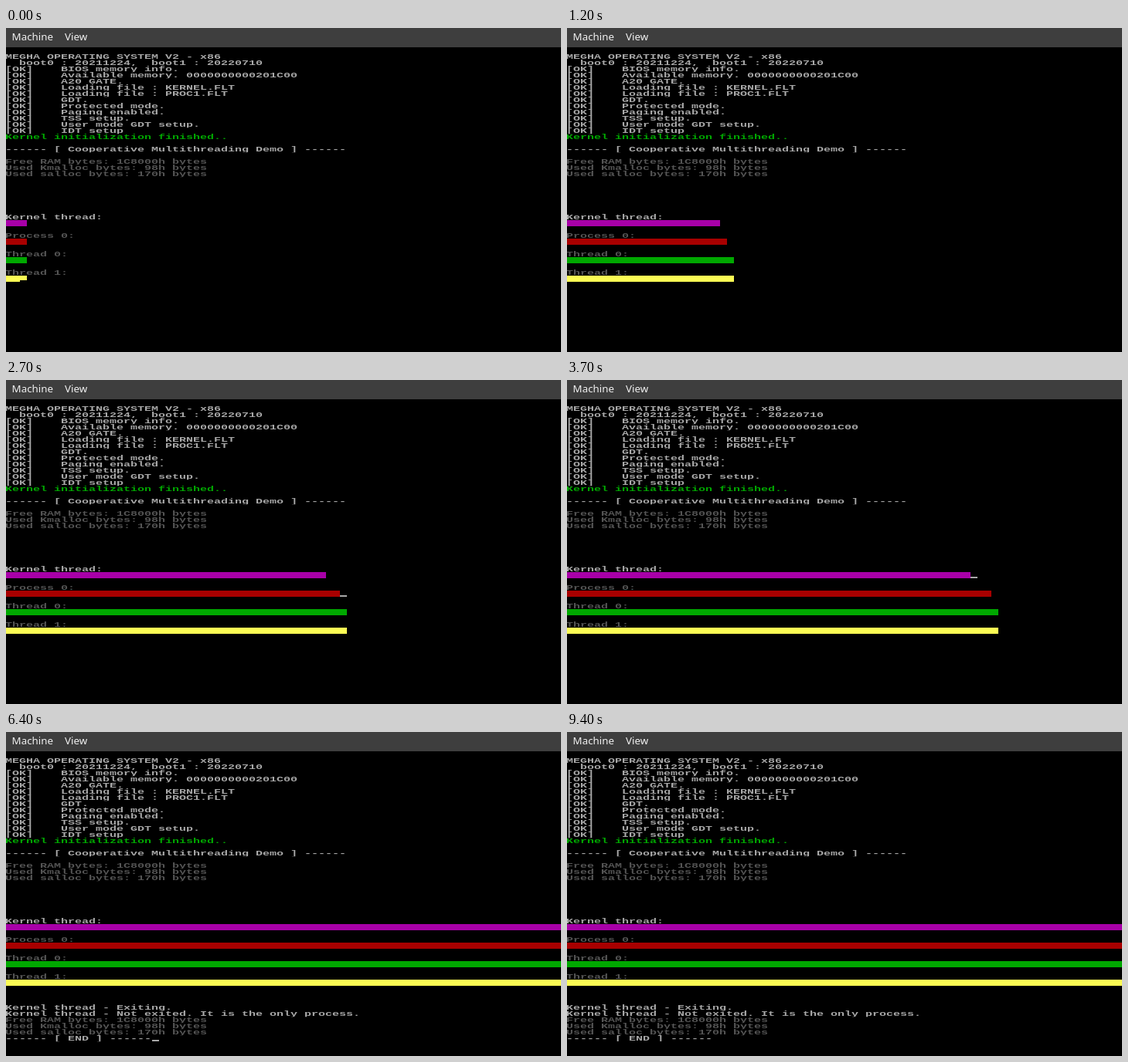
Animation of 718x420 px, one loop 9.6 s. Source, as an HTML page:

```html
<!DOCTYPE html>
<html lang="en">
<head>
<meta charset="utf-8">
<style>
  html, body { margin: 0; width: 100%; height: 100%; overflow: hidden; background: #000; }
  #menu { position: absolute; width: 718px; height: 25px; background: #3e3e3e; color: #f0f0f0;
          font: 13.33px/23px "Noto Sans", sans-serif; }
  #menu span { position: absolute; top: 0; }
  /* Text mode: every row is a flattened 8px cell that clips its glyphs */
  p { position: absolute; left: -.7px; margin: 0; height: calc(8px / .63); overflow: hidden;
      white-space: pre; color: #a8a8a8; font: bold 15px/15.5px "Liberation Mono", monospace;
      transform: scaleY(.63); transform-origin: 0 0; }
  .dim { color: #545454; }
  .ok { color: #00a800; }
  .bar, #cursor { position: absolute; left: 0; height: 8px; }
  #cursor { width: 9px; height: 2px; }
</style>
</head>
<body>
<div id="menu"><span style="left:7.6px">Machine</span><span style="left:76px">View</span></div>
<script>
const LOOP = 9600, STEP = 100, END = 5100, CELL = 9;
const rowTop = row => 25 + 8 * row;

function add(tag, className, row) {
  const element = document.createElement(tag);
  element.className = className;
  element.style.top = rowTop(row) + 'px';
  return document.body.appendChild(element);
}

function print(row, text, className = '') {
  return text.split('\n').map((line, i) => {
    const p = add('p', className, row + i);
    p.textContent = line;
    return p;
  });
}

const memory = `Free RAM bytes: 1C8000h bytes
Used Kmalloc bytes: 98h bytes
Used salloc bytes: 170h bytes`;

print(1, `MEGHA OPERATING SYSTEM V2 - x86
  boot0 : 20211224,  boot1 : 20220710
[OK]    BIOS memory info.
[OK]    Available memory. 0000000000201C00
[OK]    A20 GATE.
[OK]    Loading file : KERNEL.FLT
[OK]    Loading file : PROC1.FLT
[OK]    GDT.
[OK]    Protected mode.
[OK]    Paging enabled.
[OK]    TSS setup.
[OK]    User mode GDT setup.
[OK]    IDT setup`);
print(14, 'Kernel initialization finished..', 'ok');
print(16, '------ [ Cooperative Multithreading Demo ] ------');
print(18, memory, 'dim');
print(27, 'Kernel thread:');
print(30, 'Process 0:', 'dim');
print(33, 'Thread 0:', 'dim');
print(36, 'Thread 1:', 'dim');

const ending = [
  ...print(41, 'Kernel thread - Exiting.\nKernel thread - Not exited. It is the only process.'),
  ...print(43, memory, 'dim'),
  ...print(46, '------ [ END ] ------')
];

const bars = ['#a800a8', '#a80000', '#00a800', '#fcfc54'].map((color, i) => {
  const bar = add('div', 'bar', 28 + 3 * i);
  bar.style.background = color;
  return bar;
});
const cursor = add('div', '', 0);
cursor.id = 'cursor';

// time, then cells filled by: kernel, process, both threads
const progress = [
  [0, 3, 3, 3], [1000, 19, 20, 21], [1200, 22, 23, 24], [2000, 35, 38, 39],
  [2400, 42, 43, 44], [2700, 46, 48, 49], [3600, 57, 59, 60], [3700, 58, 61, 62],
  [4500, 70, 74, 74], [4600, 72, 76, 76], [4900, 77, 80, 80], [5000, 80, 80, 80]
];

function cellsAt(time, column) {
  const next = progress.findIndex(p => p[0] > time);
  if (next < 0) return 80;
  const a = progress[next - 1], b = progress[next];
  return Math.round(a[column] + (b[column] - a[column]) * (time - a[0]) / (b[0] - a[0]));
}

function draw(now) {
  let time = Math.floor(now % LOOP / STEP) * STEP;
  if (time > 2400 && time < 2700) time = 2400;  // short stall

  const cells = bars.map((_, i) => cellsAt(time, Math.min(i + 1, 3)));
  bars.forEach((bar, i) => bar.style.width = cells[i] * CELL + 'px');

  const done = time >= END;
  for (const line of ending) line.style.visibility = done ? 'visible' : 'hidden';

  // The cursor follows the thread that printed last; on a filled cell it is black
  const active = Math.floor(3 + time / STEP * 2.3) % 4;
  const onBar = !done && active === 3;
  const column = done ? 21 : cells[active] - onBar;
  cursor.style.left = column * CELL + 'px';
  cursor.style.top = rowTop(done ? 46 : 28 + 3 * active) + 6 + 'px';
  cursor.style.background = onBar ? '#000' : '#a8a8a8';
  const blink = Math.floor((time - 5294) / 273);
  cursor.style.visibility = blink % 2 === 0 ? 'visible' : 'hidden';
}

const start = performance.now();
function tick() {
  draw(performance.now() - start);
  requestAnimationFrame(tick);
}
tick();
</script>
</body>
</html>
```
